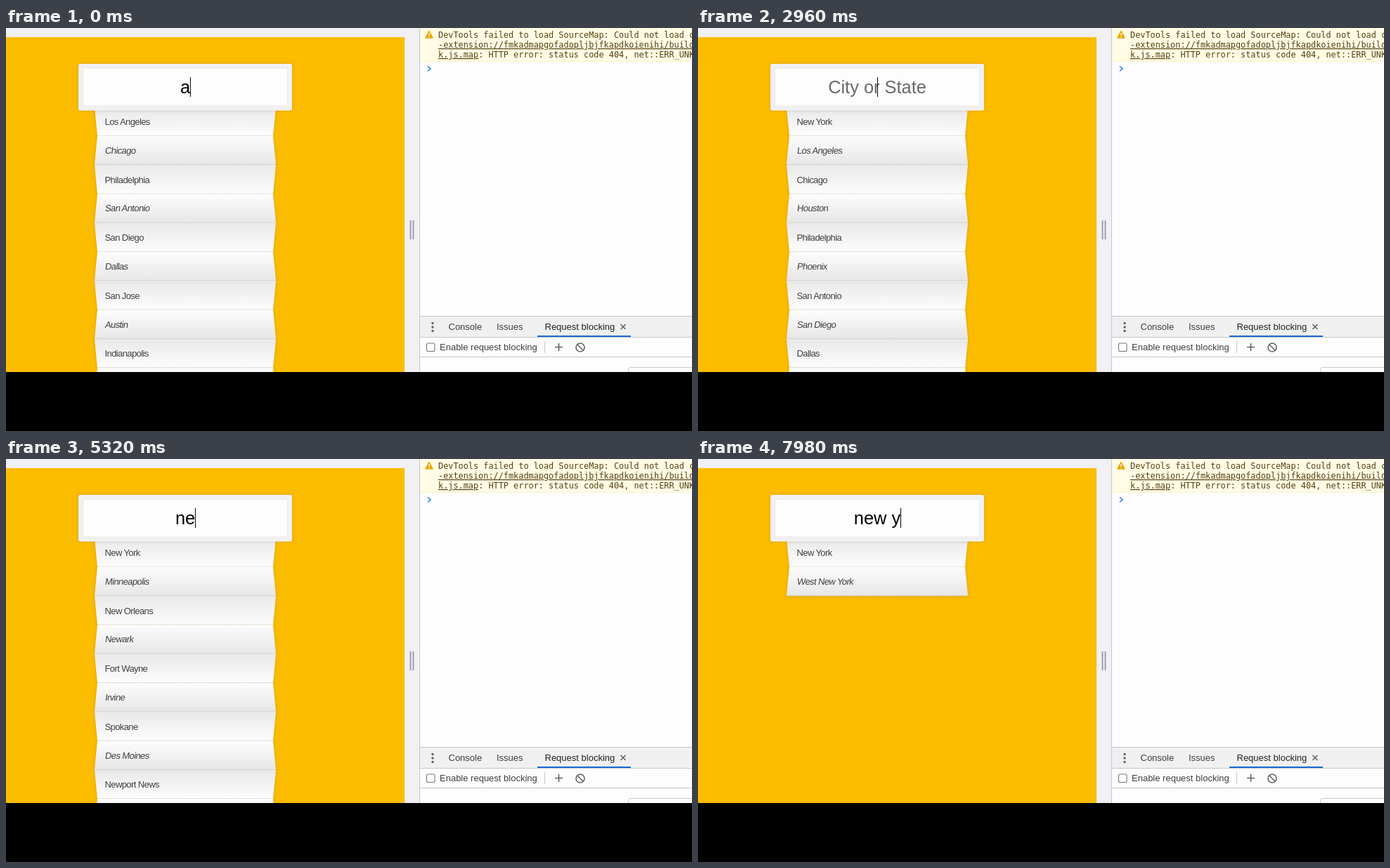
Write an HTML page that moves like this. It is 976x574 px and loops after 8 s.

```html
<!DOCTYPE html>
<html lang="en">
<head>
<meta charset="utf-8">
<title>Type ahead</title>
<style>
  html, body { margin: 0; width: 100%; height: 100%; overflow: hidden; background: #000; }
  svg { display: block; width: 976px; height: 574px; }
  text { white-space: pre; font-family: "Liberation Sans", Arial, sans-serif; }
  .query { font-size: 25.4px; text-anchor: middle; }
  .city { font-size: 13px; letter-spacing: -.6px; fill: #404040; }
  .log text { font: 11.87px "DejaVu Sans Mono", monospace; fill: #55400f; }
  .ui { font-size: 13px; fill: #3c4043; }
  .icon { fill: none; stroke: #5f6368; stroke-width: 1.6; }
</style>
</head>
<body>
<svg id="stage" viewBox="0 0 976 574">
  <defs>
    <linearGradient id="odd" x2="0" y2="1">
      <stop stop-color="#e8e8e8"/><stop offset="1" stop-color="#fdfdfd"/>
    </linearGradient>
    <linearGradient id="even" x2="0" y2="1">
      <stop stop-color="#fdfdfd"/><stop offset="1" stop-color="#e6e6e6"/>
    </linearGradient>
    <filter id="shade" x="-10%" y="-20%" width="120%" height="140%">
      <feDropShadow dx="0" dy="0" stdDeviation="2" flood-color="#7a5500" flood-opacity=".3"/>
    </filter>
    <clipPath id="page"><path d="M0 0H976V490H0Z"/></clipPath>
  </defs>
  <rect width="976" height="574"/>
  <g clip-path="url(#page)">
    <rect width="589" height="490" fill="#f1f0f5"/>
    <rect y="13" width="567" height="477" fill="#fcbc00"/>
    <path d="M575.5 274V301M579.5 274V301" stroke="#9696a6" stroke-width="1.8"/>

    <g id="list" filter="url(#shade)"></g>
    <g filter="url(#shade)"><rect x="103" y="51" width="304" height="66.5" rx="3" fill="#f1f1f3"/></g>
    <rect x="109.5" y="57.5" width="291" height="53.5" fill="#fdfdfd" stroke="#ebe9e4"/>
    <text id="query" class="query" x="255" y="93"></text>
    <rect id="caret" y="70" width="1" height="28"/>

    <rect x="589" width="387" height="490" fill="#fdfdfd"/>
    <rect x="589" width="387" height="47" fill="#fffbe5"/>
    <path d="M589 47.5H976" stroke="#fff1c2"/>
    <path d="M602 4.5L607 14H597Z" fill="#e9a800" stroke="#e9a800" stroke-width="1.5" stroke-linejoin="round"/>
    <path d="M602 7V10.5M602 12V13.3" stroke="#fff" stroke-width="1.3"/>
    <g class="log">
      <text x="615" y="14">DevTools failed to load SourceMap: Could not load content</text>
      <text x="615" y="28" text-decoration="underline">-extension://fmkadmapgofadopljbjfkapdkoienihi/build/</text>
      <text x="615" y="42"><tspan text-decoration="underline">k.js.map</tspan>: HTTP error: status code 404, net::ERR_UNKNOWN</text>
    </g>
    <path d="M600 54.5L604 58L600 61.5" fill="none" stroke="#367cf1" stroke-width="1.6"/>

    <rect x="589" y="411" width="387" height="29" fill="#f0f0f0"/>
    <path d="M588.5 0V490M589 410.5H976M589 440.5H976M589 468.5H976M766.5 446V463" stroke="#c6c6c9"/>
    <rect x="756" y="438" width="133" height="2" fill="#1a6ad6"/>
    <g fill="#5f6368">
      <circle cx="607" cy="420.5" r="1.7"/><circle cx="607" cy="426" r="1.7"/><circle cx="607" cy="431.5" r="1.7"/>
    </g>
    <g class="ui">
      <text x="629.5" y="430">Console</text>
      <text x="698" y="430">Issues</text>
      <text x="766.5" y="430" fill="#222">Request blocking</text>
      <text x="617" y="459">Enable request blocking</text>
    </g>
    <g class="icon">
      <path d="M874.5 422L881.5 429M881.5 422L874.5 429M781 454.5H792M786.5 449V460"/>
      <circle cx="817" cy="455" r="6"/><path d="M813 451L821 459"/>
      <rect x="598.5" y="449" width="11.5" height="11.5" rx="2" fill="#fff" stroke="#767676" stroke-width="1.1"/>
    </g>
    <rect x="885.5" y="483.5" width="110" height="30" rx="3" fill="#fff" stroke="#c6c6c9"/>
  </g>
</svg>
<script>
const LOOP = 8000, ROWS = 10, TOP = 112.3, STEP = 41.3;
const $ = id => document.getElementById(id);
const names = s => s.split(", ");

const all = names("New York, Los Angeles, Chicago, Houston, Philadelphia, Phoenix, San Antonio, San Diego, Dallas, San Jose");
const withA = names("Los Angeles, Chicago, Philadelphia, San Antonio, San Diego, Dallas, San Jose, Austin, Indianapolis, Jacksonville");
const withN = names("New York, Los Angeles, Houston, Phoenix, San Antonio, San Diego, San Jose, Austin, Indianapolis, Jacksonville");
const withNe = names("New York, Minneapolis, New Orleans, Newark, Fort Wayne, Irvine, Spokane, Des Moines, Newport News, Eugene");
const withNew = names("New York, New Orleans, Newark, Newport News, New Haven, New Bedford, Newton, New Britain, New Rochelle, Newport Beach");
const withNewY = names("New York, West New York");

// [start ms, value]; the list trails the typed text a little
const typed = [[0, "a"], [2400, ""], [4260, "n"], [5080, "ne"], [5900, "new"], [6700, "new "], [7540, "new y"]];
const lists = [[0, withA], [2500, all], [4700, withN], [5180, withNe], [6000, withNew], [6720, []], [7640, withNewY]];
const at = (track, t) => track.findLast(([start]) => start <= t)[1];

function add(parent, tag, attrs) {
  const el = document.createElementNS("http://www.w3.org/2000/svg", tag);
  for (const key in attrs) el.setAttribute(key, attrs[key]);
  return parent.appendChild(el);
}

const rows = Array.from({ length: ROWS }, (_, i) => {
  const even = i % 2, y = TOP + i * STEP;
  const [a, b] = even ? [130, 126] : [126, 130];
  const g = add($("list"), "g", {});
  add(g, "path", {
    d: `M${a} ${y}H${510 - a}L${510 - b} ${y + STEP}H${b}Z`,
    fill: `url(#${even ? "even" : "odd"})`
  });
  add(g, "path", { d: `M${b} ${y + STEP - .2}H${510 - b}`, stroke: even ? "#cfcbc2" : "#d3d1ca" });
  const label = add(g, "text", {
    class: "city",
    transform: `translate(140.5 ${y + (even ? 25.2 : 25.7)}) skewX(${even ? -8 : 0})`
  });
  return { g, label };
});

let shownText, shownList;

function update(t) {
  const text = at(typed, t), list = at(lists, t);
  if (text !== shownText) {
    shownText = text;
    const query = $("query");
    query.textContent = text || "City or State";
    query.setAttribute("fill", text ? "#000" : "#6a6a6a");
    $("caret").setAttribute("x", 255 + (text ? query.getComputedTextLength() / 2 - .2 : 0));
  }
  if (list !== shownList) {
    shownList = list;
    rows.forEach(({ g, label }, i) => {
      g.style.display = i < list.length ? "" : "none";
      label.textContent = list[i] || "";
    });
  }
}

const begin = performance.now();
function tick() {
  update((performance.now() - begin) % LOOP);
  requestAnimationFrame(tick);
}
tick();
</script>
</body>
</html>
```
